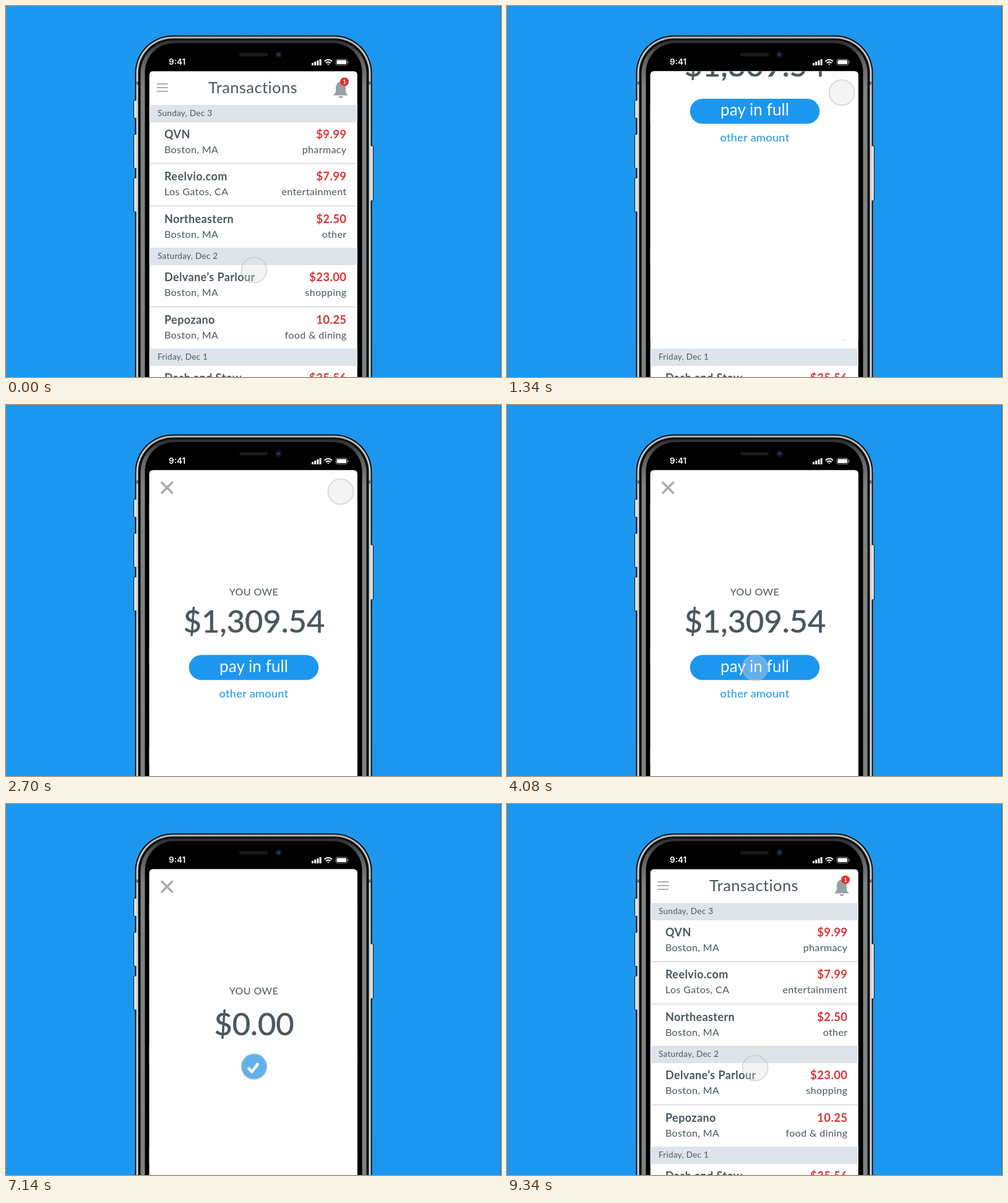
Animation, 800 px wide and 600 px high, one loop 9.36 s. Source, as an HTML page:

```html
<!DOCTYPE html>
<html lang="en">
<head>
<meta charset="utf-8">
<title>Transactions</title>
<style>
  html, body { margin: 0; width: 100%; height: 100%; overflow: hidden; background: #1c97f0; }
  svg { display: block; width: 800px; height: 600px; }
  text { font-family: Lato, sans-serif; fill: #4a575d; letter-spacing: .4px; }
  .mid { text-anchor: middle; }
  .end { text-anchor: end; }
  .date { font-size: 13.5px; letter-spacing: .3px; }
  .name { font-size: 18px; font-weight: 700; }
  .price { font-size: 18.5px; font-weight: 700; fill: #dc3232; }
  .sub { font-size: 16px; }
  .amount { font-size: 50.5px; letter-spacing: 0; stroke: #4a575d; stroke-width: .6px; }
</style>
</head>
<body>
<svg viewBox="0 0 800 600">
  <defs>
    <clipPath id="screen"><path d="M231.700 600V111.500q0-6 6-6H561.700q6 0 6 6V600z"/></clipPath>
    <linearGradient id="rim" x2="0" y2="1">
      <stop offset="0" stop-color="#b2b5b5"/>
      <stop offset=".1" stop-color="#d3d5d4"/>
      <stop offset="1" stop-color="#dcdedc"/>
    </linearGradient>
    <linearGradient id="bezel" gradientUnits="userSpaceOnUse" x1="0" y1="55" x2="0" y2="130">
      <stop offset="0" stop-color="#2b2d2d"/>
      <stop offset=".4" stop-color="#5c6060"/>
      <stop offset="1" stop-color="#7d8280"/>
    </linearGradient>
  </defs>

  <path d="M799.500 0v600" stroke="#1678c2"/>
  <rect x="208.500" y="47.500" width="383" height="700" rx="61" fill="#0b0c0d"/>
  <g fill="#dfe1e0" stroke="#0c0f12">
    <rect x="206.500" y="152.500" width="6" height="29" rx="2"/>
    <rect x="206.500" y="207.500" width="6" height="55" rx="2"/>
    <rect x="206.500" y="278" width="6" height="55" rx="2"/>
    <rect x="587.500" y="226" width="6" height="89" rx="2"/>
  </g>
  <rect x="210.500" y="49.500" width="379" height="700" rx="59" fill="url(#rim)"/>
  <path d="M210 122h5v5h-5zM585 122h5v5h-5z" fill="#6d7376"/>
  <rect x="213.500" y="52.500" width="373" height="700" rx="56" fill="#0d0e0f"/>
  <rect x="217.500" y="55.500" width="365" height="700" rx="53" fill="url(#bezel)"/>
  <rect x="224.500" y="60" width="351" height="700" rx="47"/>

  <rect x="377" y="76" width="46" height="5.500" rx="2.700" fill="#171819"/>
  <circle cx="440.500" cy="78.500" r="5.500" fill="#0c1424"/>
  <circle cx="440.500" cy="78.500" r="2.500" fill="#1d3c6c"/>

  <text x="263" y="95.300" style="font:600 13.5px Inter,sans-serif;fill:#fff;letter-spacing:0">9:41</text>
  <path d="M494 92h3v4h-3zM498.200 90h3v6h-3zM502.400 88h3v8h-3zM506.600 86h3v10h-3z" fill="#fff"/>
  <g fill="none" stroke="#fff" stroke-width="2">
    <path d="M514.600 89.400q6.200-5.200 12.400 0M517 92.200q3.800-3.200 7.600 0"/>
    <path d="M519 93.600h3.600l-1.800 2.200z" fill="#fff" stroke="none"/>
    <rect x="533" y="86" width="18.500" height="9.500" rx="2.500" stroke="#888" stroke-width="1"/>
    <rect x="534.500" y="87.500" width="15.500" height="6.500" rx="1.200" fill="#fff" stroke="none"/>
    <path d="M553 89v3.500" stroke="#888" stroke-width="1.200"/>
  </g>

  <g clip-path="url(#screen)">
    <rect x="231" y="105" width="338" height="495" fill="#fff"/>
    <path d="M243.500 126h18M243.500 132h18M243.500 138h18" stroke="#a9b0b3" stroke-width="2"/>
    <text class="mid" x="399" y="141" font-size="25.500">Transactions</text>
    <g fill="#95a1a5">
      <path d="M529 144.500c4-3 4-6 4-11 0-7 3-10 6.500-11a1.700 1.700 0 0 1 3 0c3.500 1 6.500 4 6.500 11 0 5 0 8 4 11z"/>
      <path d="M537.500 146h7q-1 3-3.500 3t-3.500-3z"/>
    </g>
    <circle cx="547" cy="122.500" r="7" fill="#e03230"/>
    <text class="mid" x="547" y="125.700" style="font-size:9px;font-weight:700;fill:#fff;letter-spacing:0">1</text>
    <g id="list"></g>

    <g id="panel">
      <rect x="231" y="105" width="338" height="690" fill="#fff"/>
      <path d="M252 125.500l16.500 16.500M268.500 125.500l-16.500 16.500" stroke="#a8acae" stroke-width="3.600" stroke-linecap="round"/>
      <text class="mid" x="400.500" y="308" font-size="16">YOU OWE</text>
      <text class="mid amount" id="due" x="401" y="368">$1,309.54</text>
      <text class="mid amount" id="cleared" x="401" y="374.500">$0.00</text>
      <rect id="button" y="404.300" height="40.500" rx="20.250" fill="#1c97f0"/>
      <text class="mid" id="pay" x="400.500" y="431.700" style="font-size:26px;fill:#fff;letter-spacing:.1px">pay in full</text>
      <text class="mid" id="other" x="400.500" y="473" style="font-size:18px;fill:#1c93e2">other amount</text>
      <path id="check" d="M392.500 428l5 5 9-12" fill="none" stroke="#fff" stroke-width="4.800" stroke-linecap="round" stroke-linejoin="round"/>
    </g>
  </g>
  <circle id="touch" r="20.500" fill="rgba(222,222,222,.35)" stroke="rgba(190,190,190,.5)" stroke-width="2"/>
</svg>
<script>
const LOOP = 9360;
const PANEL_HEIGHT = 690;
const el = id => document.getElementById(id);

const dates = [[160, "Sunday, Dec 3"], [391, "Saturday, Dec 2"], [554, "Friday, Dec 1"]];
const rows = [
  [187, "QVN", "Boston, MA", "$9.99", "pharmacy"],
  [255, "Reelvio.com", "Los Gatos, CA", "$7.99", "entertainment"],
  [323.5, "Northeastern", "Boston, MA", "$2.50", "other"],
  [418, "Delvane’s Parlour", "Boston, MA", "$23.00", "shopping"],
  [486.5, "Pepozano", "Boston, MA", "10.25", "food &amp; dining"],
  [581, "Dash and Stow", "Boston, MA", "$35.56", "groceries"]
];
const label = (kind, x, y, text) => `<text class="${kind}" x="${x}" y="${y}">${text}</text>`;

el("list").innerHTML =
  rows.map(([y, name, place, price, kind]) =>
    `<path d="M231 ${y}h338" stroke="#d3d6d8" stroke-width="1.500"/>` +
    label("name", 256, y + 27.3, name) + label("sub", 256, y + 51, place) +
    label("price end", 550.5, y + 27.3, price) + label("sub end", 550.5, y + 51, kind)).join("") +
  dates.map(([y, day]) =>
    `<rect x="231" y="${y}" width="338" height="27" fill="#dfe4e8"/>` +
    label("date", 245, y + 18.2, day)).join("");

const mix = (a, b, k) => a + (b - a) * k;
const linear = (t, start, end) => Math.min(1, Math.max(0, (t - start) / (end - start)));
const ease = (t, start, end) => {
  const k = linear(t, start, end);
  return k < .5 ? 2 * k * k : 1 - 2 * (1 - k) ** 2;
};

function draw(t) {
  const toBell = ease(t, 0, 940);
  const toButton = ease(t, 3120, 4060);
  const x = mix(mix(401, 541, toBell), 401, toButton);
  const y = mix(mix(427, 140, toBell), 425, toButton) + 2 * ease(t, 9020, 9340);
  el("touch").setAttribute("transform", `translate(${x} ${y})`);

  const shown = ease(t, 970, 1620) - ease(t, 7140, 7840);
  el("panel").setAttribute("transform", `translate(0 ${(shown - 1) * PANEL_HEIGHT})`);

  const shrink = ease(t, 4160, 4680);
  const width = mix(209.5, 41, shrink);
  el("button").setAttribute("width", width);
  el("button").setAttribute("x", mix(400.5, 401, shrink) - width / 2);
  el("pay").style.opacity = 1 - linear(t, 4160, 4340);
  el("other").style.opacity = 1 - linear(t, 4160, 4500);
  el("check").style.opacity = linear(t, 4500, 4720);

  const swap = ease(t, 4760, 5380);
  el("due").style.opacity = 1 - linear(t, 4740, 5000);
  el("cleared").style.opacity = linear(t, 4900, 5300);
  el("cleared").setAttribute("transform", `translate(0 ${-40 * (1 - swap)})`);
}

function tick() {
  draw(performance.now() % LOOP);
  requestAnimationFrame(tick);
}
tick();
</script>
</body>
</html>
```
